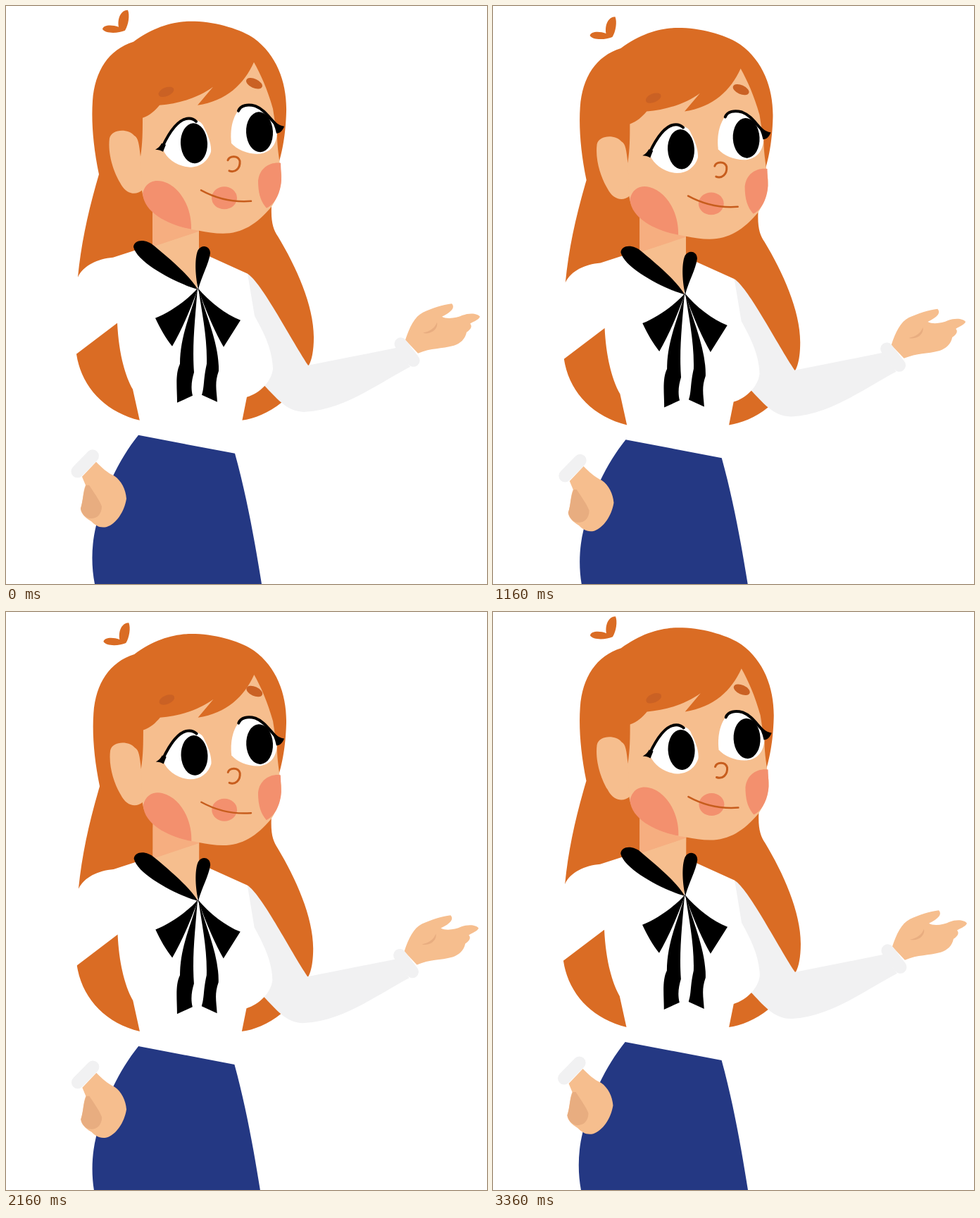
Recreate the animation shown at these times as an HTML page. Size 683 px wide and 820 px high, loop 3.4 s.

```html
<!DOCTYPE html>
<html lang="en">
<head>
<meta charset="utf-8">
<title>Presenter</title>
<style>
  html, body { margin: 0; width: 100%; height: 100%; overflow: hidden; background: #fff; }
  svg { display: block; width: 683px; height: 820px; }
  .hair { fill: #da6c24; }
  .skin { fill: #f6be8e; }
  .shade { fill: #e8ad80; }
  .neck { fill: #f6ae80; }
  .blush { fill: #f3906e; }
  .brow { fill: #ca6124; }
  .white { fill: #fff; }
  .sleeve { fill: #f1f1f2; }
  .cuff { stroke: #f1f1f2; stroke-width: 18; }
  .skirt { fill: #243883; }
  .line { fill: none; stroke-linecap: round; }
  .lash { stroke: #000; stroke-width: 4; }
  .lid { stroke: #000; stroke-width: 3.2; }
  .rust { stroke: #c75d1d; }
</style>
</head>
<body>
<svg viewBox="0 0 683 820">
  <g id="figure">
    <!-- hair -->
    <path class="hair" d="M102 385C107 335 117 290 132 239C124 200 121 165 123 135C126 92 146 62 181 51C212 28 242 21 268 22
      C300 23 335 34 352 46C385 70 399 110 398 150C397 185 392 206 388 221L370 260L377 285C376 308 380 318 386 327
      C412 370 437 425 437 470C437 490 434 503 430 510L391 563C374 577 352 586 335 588L190 588C140 576 107 540 100 494Z"/>
    <path class="hair" d="M169 35C160 39 141 40 137 33C138 27 150 26 160 30C158 18 163 6 173 6C176 13 174 27 169 35Z"/>

    <!-- neck and face -->
    <path class="skin" d="M208 285L274 310L274 360L272 400L208 348Z"/>
    <path class="neck" d="M208 285L274 305L274 320L208 342Z"/>
    <path class="skin" d="M191 214C189 197 188 187 182 184C174 174 150 174 147 188C144 212 154 238 162 251C170 267 184 270 194 261L204 215Z"/>
    <path class="skin" d="M194 159C205 155 211 149 218 141C247 139 275 129 294 115L272 141C313 135 338 111 352 80
      C362 98 371 118 379 146L385 185C385 200 388 218 391 238C392 256 386 271 377 285C356 310 335 323 308 323
      C296 323 285 321 274 319C235 313 197 296 193 262L191 214C194 195 194 178 194 159Z"/>
    <path class="blush" d="M194 266C198 250 210 246 222 249C246 255 264 285 263 317C236 312 196 296 194 266Z"/>
    <path class="blush" d="M390 223C376 221 360 229 358 248C358 267 362 278 370 287C381 282 390 266 391 247Z"/>
    <ellipse class="blush" cx="310" cy="272.500" rx="18" ry="16"/>
    <path class="line rust" stroke-width="2.500" d="M277 261.500C298 273 322 279 348 277"/>
    <path class="line rust" stroke-width="3" d="M315 219C317 213 329 211 332 220C333 231 325 237 317 234"/>
    <g id="brows">
      <ellipse class="brow" cx="227.500" cy="122" rx="11.500" ry="6.200" transform="rotate(-22 227.500 122)"/>
      <ellipse class="brow" cx="352.500" cy="110" rx="12.200" ry="6.500" transform="rotate(24 352.500 110)"/>
    </g>

    <g id="open">
      <path class="white" d="M223 204C226 186 239 164 256 162C268 160 278 163 281 172C286 182 292 195 291 207C287 220 276 229 261 229C244 228 228 217 223 204Z"/>
      <ellipse cx="267" cy="195" rx="19" ry="28.500" transform="rotate(-3 267 195)"/>
      <path class="line lash" d="M222 200C231 181 243 162 257 160C264 159 268 162 270 164"/>
      <path d="M212 204C216 202 219 199 221 195L227 197L223 207C220 205 216 204 212 204Z"/>
      <path class="white" d="M320 195C317 170 325 148 338 142C357 138 381 160 385 180C384 198 375 208 360 210C344 211 328 204 320 195Z"/>
      <ellipse cx="360" cy="179" rx="19" ry="28.500" transform="rotate(-3 360 179)"/>
      <path class="line lash" d="M330 149C333 141 343 139 354 142C367 147 373 158 384 169"/>
      <path d="M372 153C379 163 387 170 395 171C393 177 389 181 384 181C382 171 378 162 372 153Z"/>
    </g>
    <g id="shut">
      <path class="line lid" d="M220 203C226 190 238 181 253 178.500C267 181 279 189 288 198"/>
      <path d="M211 205C216 202 219 199 222 195L226 198L222 208C219 206 215 205 211 205Z"/>
      <path class="line lid" d="M320 193C328 179 338 167 347 162.500C361 161 375 166 386 172"/>
      <path d="M379 169C384 172 389 173 394 173C392 178 390 180 387 180C385 176 382 173 379 169Z"/>
    </g>

    <!-- blouse -->
    <path class="sleeve" d="M343 380C363 393 401 467 429 510L555 485L574 512C530 535 480 573 425 576C399 577 384 556 366 538L340 500Z"/>
    <path class="white" d="M152 357L186 346L205 340L271 402L276 348L290 356L343 380L353 440C366 464 378 486 379 515
      C377 533 360 550 342 555L335 590L325 637L188 610L190 589L180 544C168 523 160 490 158 450L92 500L94 385L102 385
      C110 368 130 359 152 357Z"/>

    <!-- bow -->
    <path d="M272 402C245 395 186 365 181 342C182 331 199 330 211 341C235 361 262 384 272 402Z"/>
    <path d="M273 402C268 380 268 355 273 346C278 338 290 340 290 351C288 366 278 383 273 402Z"/>
    <path d="M273 400C257 418 232 435 212 443C219 458 227 472 236 483Q255 450 273 400Z"/>
    <path d="M272 400C289 420 312 438 333 446L309 484Q292 455 272 400Z"/>
    <path d="M272 400C266 430 247 464 247 508C240 522 243 543 243 563L265 553C262 541 264 530 267 520C264 480 269 440 272 400Z"/>
    <path d="M273 400C278 435 286 470 285 508C280 530 282 540 278 552L300 562C299 545 296 535 302 518C303 480 284 440 273 400Z"/>

    <path class="skirt" d="M188 609L325 635C343 700 354 765 363 820L366 842L129 842L126 820C121 795 121 765 128 737C138 690 160 644 188 609Z"/>

    <!-- hands -->
    <path class="skin" d="M108 668L128 647C136 655 143 662 154 667C164 674 170 686 171 699C168 718 156 735 143 739C133 741 127 737 121 731C112 726 106 719 106 713C110 700 109 690 113 680Z"/>
    <path class="shade" d="M114 680C109 690 110 702 106 713C108 721 113 726 119 727C128 728 136 722 136 710C133 702 128 695 118 680Z"/>
    <path class="line cuff" d="M101.500 660.500L123 638.500"/>
    <path class="skin" d="M567 474C573 456 580 441 592 435C605 429 620 424 633 422.500C638 428 633 434 619 441C626 445 640 443 648 439
      C658 435 670 436 673 441C671 446 661 449 659 451C664 456 656 462 654 463C652 473 645 479 636 482C618 487 604 485 585 493Z"/>
    <path class="shade" d="M592 464C602 462 609 457 612 449C614 457 605 467 592 464Z"/>
    <path class="line cuff" d="M560.500 479.500L578.500 503"/>
  </g>
</svg>
<script>
  const LOOP = 3400, STEP = 40;
  const [figure, brows, open, shut] =
    ["figure", "brows", "open", "shut"].map(id => document.getElementById(id));

  function ease(t, from, to) {
    const u = Math.min(1, Math.max(0, (t - from) / (to - from)));
    return u * u * (3 - 2 * u);
  }

  function draw(t) {
    // breathing: the figure sinks and shrinks slightly
    const drop = (5.9 - 7.3 * Math.cos(2 * Math.PI * (t - 260) / 2800)) / 13;
    const scale = 1 - 0.0068 * drop;

    // a faint lean and stretch in the second half
    const lean = ease(t, 1440, 2400);
    figure.setAttribute("transform", `matrix(${scale} 0 ${-0.0022 * lean} ${scale + 0.0014 * lean}
      ${272 * (1 - scale) + lean} ${13.15 * drop})`);

    const lift = 6.3 * (ease(t, 1440, 1940) - ease(t, 2960, 3380));
    brows.setAttribute("transform", `translate(0 ${-lift})`);

    const blink = t >= 680 && t < 960;
    open.style.display = blink ? "none" : "";
    shut.style.display = blink ? "" : "none";
  }

  const start = performance.now();
  function tick() {
    const t = (performance.now() - start) % LOOP;
    draw(Math.floor(t / STEP) * STEP);
    requestAnimationFrame(tick);
  }
  tick();
</script>
</body>
</html>
```
